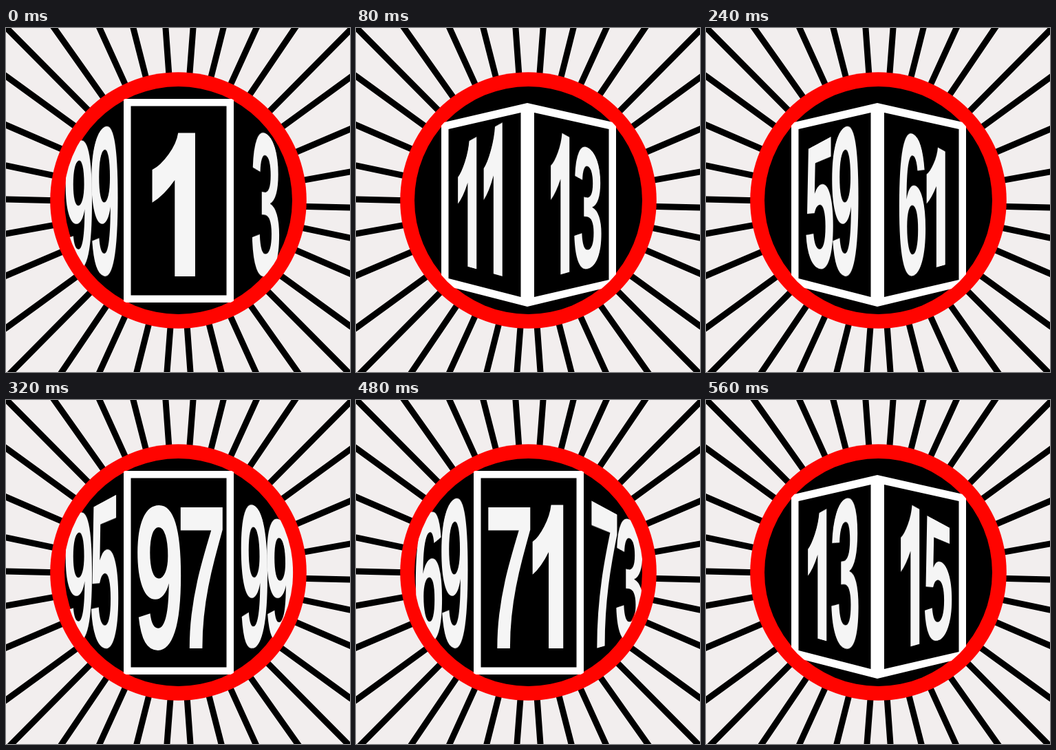
An HTML page with a canvas that plays this animation: 500 by 500 pixels, repeating every 0.64 s.

```html
<!DOCTYPE html>
<html lang="en">
<head>
<meta charset="utf-8">
<title>Spinning counter</title>
<style>
  html, body { margin: 0; width: 100%; height: 100%; overflow: hidden; background: #f2eeee; }
  canvas { display: block; width: 500px; height: 500px; }
</style>
</head>
<body>
<canvas id="stage" width="500" height="500"></canvas>
<script>
const ctx = document.getElementById('stage').getContext('2d');
const STEP_MS = 80;
const CENTER = 250.5;
const INK = '#f5f5f5';

// Three numbers: a face seen head-on with both neighbours. Two: the edge view.
const STEPS = [
  ['99', '1', '3'], ['11', '13'],
  ['21', '23', '25'], ['59', '61'],
  ['95', '97', '99'], ['37', '39'],
  ['69', '71', '73'], ['13', '15'],
];

// Lines across the stage, hidden in the middle by the disc.
const RAYS = [
  [272, 0, 234, 500], [316, 0, 190, 500], [364, 0, 136, 500],
  [420, 0, 81, 500], [501, 2, 8, 500], [500, 72, 0, 436],
  [500, 147, 0, 360], [500, 209, 0, 299], [500, 261, 0, 249],
  [500, 305, 0, 200], [500, 357, 0, 141], [500, 433, 0, 70],
  [1, 0, 497, 500], [70, 0, 424, 500], [136, 0, 363, 500],
  [185, 0, 313, 500], [232, 0, 268, 500],
];

function polygon(points, color) {
  ctx.beginPath();
  points.forEach(([x, y]) => ctx.lineTo(x, y));
  ctx.fillStyle = color;
  ctx.fill();
}

function disc(radius, color) {
  ctx.beginPath();
  ctx.arc(CENTER, CENTER, radius, 0, 7);
  ctx.fillStyle = color;
  ctx.fill();
}

// A "1" without a foot, in units of a 100px font, y upwards from the baseline.
const one = new Path2D(
  'M40.8 0H24.5V-47Q16-39.5 6.5-36V-52Q13-54 19.5-59.5T27.2-70H40.8Z');

// Condensed digits: `em` sets the width, `cap` the height.
function drawDigits(g, text, x, base, em, cap, step) {
  g.fillStyle = INK;
  g.font = 'bold 100px "Liberation Sans", Arial, sans-serif';
  [...text].forEach((digit, i) => {
    g.save();
    g.translate(x + i * step, base);
    g.scale(em / 100, cap / 68.8);
    if (digit === '1') g.fill(one);
    else g.fillText(digit, 0, 0);
    g.restore();
  });
}

const CAP = 217, PAD = 16, FACE_W = 78;
const strip = document.createElement('canvas');
strip.width = FACE_W;
strip.height = CAP + 2 * PAD;
const flat = strip.getContext('2d');

// Digits on a receding face: each column shrinks with distance from the tall edge.
function drawSide(text, left, tallOnRight) {
  flat.clearRect(0, 0, strip.width, strip.height);
  drawDigits(flat, text, -2, PAD + CAP, 79, CAP, 37.5);
  const start = left + (text.length === 1 ? 17 : 0);
  for (let u = 0; u < FACE_W; u++) {
    const depth = tallOnRight ? 75 - u : u;
    const top = 146 - (tallOnRight ? 9 : 0) + 0.54 * depth;
    const bottom = 363 - 0.28 * depth;
    const k = (bottom - top) / CAP;
    ctx.drawImage(strip, u, 0, 1, strip.height,
      start + u, top - PAD * k, 1, strip.height * k);
  }
}

function drawBackdrop() {
  ctx.fillStyle = '#f2eeee';
  ctx.fillRect(0, 0, 500, 500);
  ctx.strokeStyle = '#000';
  ctx.lineWidth = 9;
  ctx.lineCap = 'square';
  ctx.beginPath();
  for (const [x0, y0, x1, y1] of RAYS) {
    ctx.moveTo(x0, y0);
    ctx.lineTo(x1, y1);
  }
  ctx.stroke();
  disc(186.3, '#ff0400');
  disc(165.5, '#000');
}

function drawFront([before, value, after]) {
  drawSide(before, 86, true);
  drawSide(after, 341, false);
  ctx.fillStyle = '#fff';
  ctx.fillRect(171, 103, 160, 296);
  ctx.fillStyle = '#000';
  ctx.fillRect(181.5, 113.5, 139, 275);
  if (value.length === 1) drawDigits(ctx, value, 200.7, 361, 182, 205, 0);
  else drawDigits(ctx, value, 186.7, 361, 130, 205, 61.5);
}

function drawEdge([left, right]) {
  polygon([[124, 138], [249, 109], [378, 138], [378, 374], [249, 405], [124, 373]], '#fff');
  polygon([[134.5, 147], [239.5, 123], [239.5, 391], [134.5, 364]], '#000');
  polygon([[259, 123], [367.5, 147], [367.5, 366], [259, 391]], '#000');
  drawSide(left, 145, true);
  drawSide(right, 280, false);
}

function render(now) {
  const numbers = STEPS[Math.floor(now / STEP_MS) % STEPS.length];
  drawBackdrop();
  ctx.save();
  ctx.beginPath();
  ctx.arc(CENTER, CENTER, 166.8, 0, 7);
  ctx.clip();
  (numbers.length === 3 ? drawFront : drawEdge)(numbers);
  ctx.restore();
  requestAnimationFrame(render);
}

render(performance.now());
</script>
</body>
</html>
```
